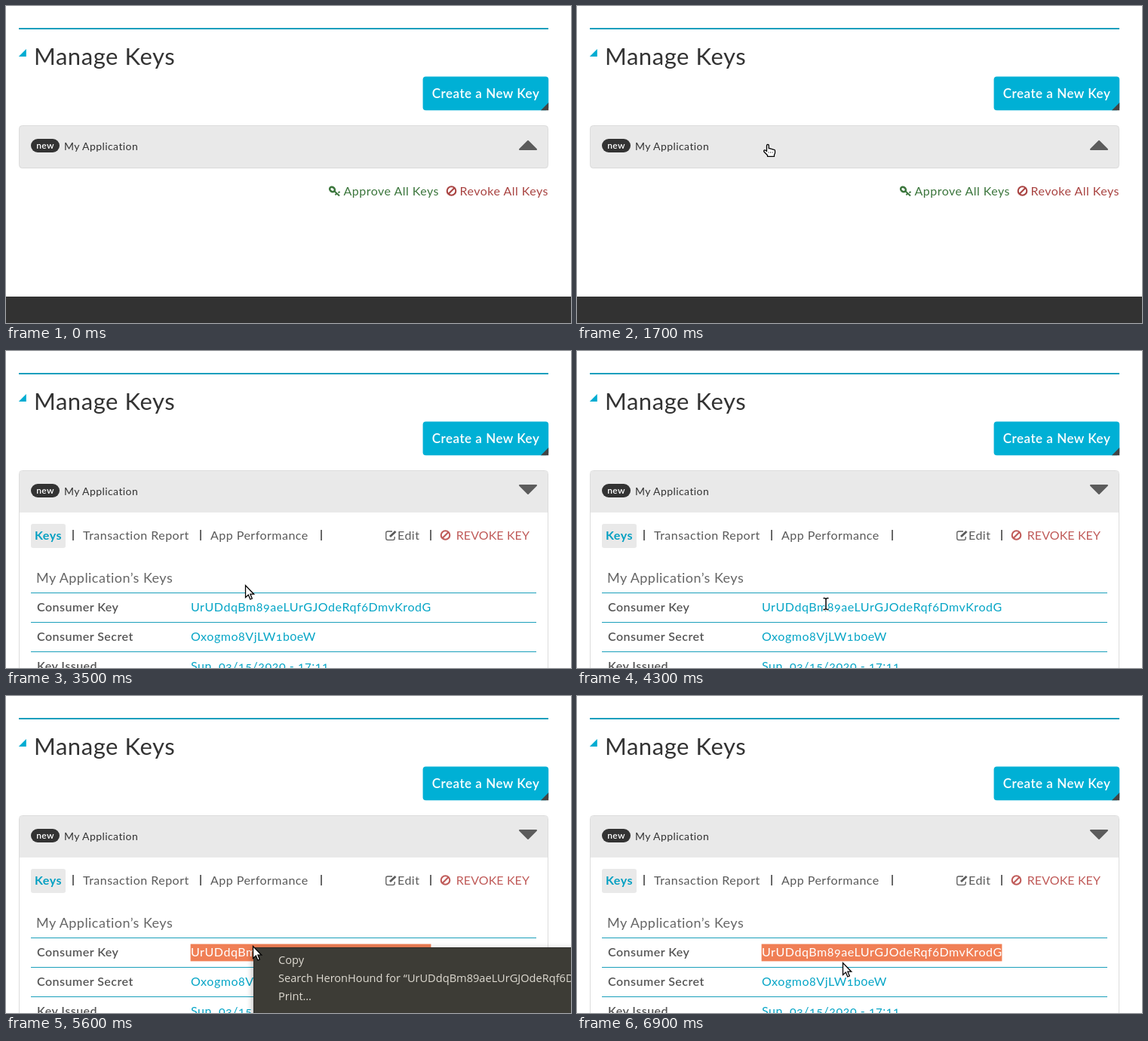
Animation of 749 by 420 pixels, one loop 9.1 s. Source, as an HTML page:

```html
<!DOCTYPE html>
<html lang="en">
<head>
<meta charset="utf-8">
<title>Manage Keys</title>
<style>
  html, body { margin: 0; width: 100%; height: 100%; overflow: hidden; background: #fff; }
  svg { display: block; width: 749px; height: 420px; }
  text { font: 16px Lato, "Open Sans", sans-serif; letter-spacing: .03em; font-variant-numeric: oldstyle-nums; white-space: pre; }
  .title { font-size: 31px; letter-spacing: .018em; fill: #333; }
  .button { font-size: 17px; font-weight: 600; fill: #fff; }
  .badge { font-size: 12px; font-weight: 600; fill: #fff; }
  .app { font-size: 14px; fill: #333; }
  .caption { font-size: 18px; letter-spacing: .025em; fill: #666; }
  .label { font-weight: 600; fill: #555; }
  .value { letter-spacing: .035em; fill: #05a5c6; }
  .tab { fill: #5a5a5a; }
  .current { font-weight: 700; fill: #05a0c2; }
  .green { fill: #3c763d; color: #3c763d; }
  .red { fill: #a94442; color: #a94442; }
  .pale { fill: #c05b59; color: #c05b59; }
  .pale text { letter-spacing: .006em; }
  .chevron { fill: #5c5c5c; stroke: #5c5c5c; stroke-width: 2; stroke-linejoin: round; }
  .end { text-anchor: end; }
  .mid { text-anchor: middle; }
  #menu { filter: drop-shadow(0 3px 5px rgba(0, 0, 0, .35)); }
  #menu text { font: 14.6px "Open Sans", "Noto Sans", sans-serif; letter-spacing: 0; fill: #dfdbd2; }
</style>
</head>
<body>
<svg viewBox="0 0 749 420">
  <defs>
    <linearGradient id="glow" x2="0" y2="1">
      <stop stop-color="#f68456"/>
      <stop offset="1" stop-color="#e9642f"/>
    </linearGradient>
    <g id="ban" fill="none" stroke="currentColor" stroke-width="2.1">
      <circle r="5.8"/>
      <path d="M-4 4 4-4"/>
    </g>
    <path id="stem" d="M-3.5-7.500H-1.500L0-6.500 1.500-7.500H3.500M0-6.500V6.500M-3.500 7.500H-1.500L0 6.500 1.500 7.500H3.500"/>
  </defs>

  <path d="M17 30H719" stroke="#1a9fbd" stroke-width="2.200"/>
  <path d="M16.800 67 26.800 57V67Z" fill="#00acd2"/>
  <text class="title" x="37" y="78">Manage Keys</text>
  <rect x="552.600" y="93.600" width="166.600" height="44.700" rx="4" fill="#00b0d5"/>
  <path d="M709 138.300 719.200 128V138.300Z" fill="#444"/>
  <text class="button mid" x="636" y="122">Create a New Key</text>

  <g id="closed">
    <rect x="17.500" y="159.500" width="701" height="56" rx="4" fill="#f1f1f1"/>
    <rect x="17.500" y="158.500" width="701" height="56" rx="4" fill="#e9e9e9" stroke="#dcdcdc"/>
    <path class="chevron" d="M681 190 692 179 703 190Z"/>
    <g class="green">
      <g fill="none" stroke="currentColor">
        <ellipse cx="432.500" cy="243" rx="3.600" ry="2.900" stroke-width="2.500" transform="rotate(35 432.500 243)"/>
        <path d="M435 245 442 251.500M438 248.500 436.500 250.500M440.500 247.500 442.500 246" stroke-width="2"/>
      </g>
      <text x="447.500" y="251">Approve All Keys</text>
    </g>
    <g class="red">
      <use href="#ban" x="590.500" y="245"/>
      <text class="end" x="719" y="251">Revoke All Keys</text>
    </g>
    <rect y="385" width="749" height="35" fill="#323232"/>
  </g>

  <g id="open">
    <rect x="17.500" y="158.500" width="701" height="280" rx="4" fill="#fff" stroke="#dcdcdc"/>
    <path d="M18 214V162Q18 159 21 159H715Q718 159 718 162V214Z" fill="#e9e9e9"/>
    <path class="chevron" d="M681 178H703L692 189Z"/>

    <rect x="33" y="229" width="46" height="32" rx="3" fill="#e9e9e9"/>
    <text class="current" x="38" y="250">Keys</text>
    <text class="tab" x="102" y="250">Transaction Report</text>
    <text class="tab" x="271" y="250">App Performance</text>
    <path d="M89 237V251M258 237V251M418 237V251M563 237V251" stroke="#444" stroke-width="1.600"/>
    <g fill="none" stroke="#5a5a5a" stroke-width="1.300">
      <path d="M512 239H506Q503.800 239 503.800 241V248Q503.800 250.300 506 250.300H513Q515.200 250.300 515.200 248V246"/>
      <path d="M509 246 516.500 239" stroke-width="2.900"/>
    </g>
    <text class="tab" x="519" y="250">Edit</text>
    <g class="pale">
      <use href="#ban" x="582.500" y="244"/>
      <text class="end" x="694" y="250">REVOKE KEY</text>
    </g>

    <text class="caption" x="40" y="307">My Application’s Keys</text>
    <path d="M33 320.500H703M33 359.500H703M33 398.500H703" stroke="#1a9fbb" stroke-width="1.200"/>
    <text class="label" x="41" y="345">Consumer Key</text>
    <text class="label" x="41" y="384">Consumer Secret</text>
    <text class="label" x="41" y="423">Key Issued</text>
    <rect id="mark" x="244.600" y="328.600" width="318.800" height="22.800" fill="#f07f55"/>
    <text id="key" class="value" x="245" y="345">UrUDdqBm89aeLUrGJOdeRqf6DmvKrodG</text>
    <text class="value" x="245" y="384">Oxogmo8VjLW1b0eW</text>
    <text class="value" x="245" y="423">Sun, 03/15/2020 - 17:11</text>
  </g>

  <rect x="33" y="176" width="38" height="18" rx="9" fill="#333"/>
  <text class="badge mid" x="52" y="189">new</text>
  <text class="app" x="77" y="191">My Application</text>

  <g id="menu">
    <rect x="328.500" y="333.500" width="460" height="120" fill="#3d3c36" stroke="#2d2c29"/>
    <rect id="hover" x="330" y="338" width="440" height="23" fill="url(#glow)"/>
    <text x="361" y="355">Copy</text>
    <text x="361" y="379">Search HeronHound for “UrUDdqBm89aeLUrGJOdeRqf6DmvKrodG”</text>
    <text x="361" y="403">Print…</text>
  </g>

  <path id="arrow" d="M.5.500V16.500L4.300 13 6.800 19 9.300 18 6.900 12.200H11.700Z" fill="#fff" stroke="#000" stroke-width="1.300"/>
  <g id="hand" stroke="#000" stroke-linejoin="round">
    <path d="M4.500 9V2Q4.500.500 5.900.500T7.300 2V5.800Q9 5.300 10 6.400 11.600 6 12.500 7.200 15.500 6.900 15.500 9V12L14.500 14V16.300H5.500V14.800L.9 10Q.3 8.300 1.600 7.900 3 7.800 4.500 9.500Z" fill="#fff" stroke-width="1.300"/>
    <path d="M6.500 11H13.500" stroke-dasharray="1 1.500"/>
  </g>
  <g id="beam" fill="none">
    <use href="#stem" stroke="#fff" stroke-width="3"/>
    <use href="#stem" stroke="#000" stroke-width="1.500"/>
  </g>
</svg>
<script>
  const LOOP = 9100;
  const $ = id => document.getElementById(id);
  const show = (id, on) => { $(id).style.display = on ? '' : 'none'; };

  // Pointer poses: start time, shape, x, y
  const poses = [
    [700, 'arrow', 165, 38], [800, 'arrow', 206, 66], [900, 'arrow', 239, 90],
    [1100, 'arrow', 245, 106], [1200, 'arrow', 251, 132], [1300, 'arrow', 253, 157],
    [1400, 'hand', 247, 180], [1600, 'hand', 247, 181], [1700, 'hand', 247, 183],
    [3200, 'hand', 268, 226], [3300, 'hand', 293, 276], [3500, 'arrow', 317, 310],
    [3700, 'arrow', 325, 322], [3800, 'beam', 334, 339], [3900, 'beam', 338, 334],
    [4300, 'beam', 330, 335], [5600, 'arrow', 327, 331],
    [6100, 'arrow', 333, 337], [6200, 'arrow', 339, 343],
    [6300, 'arrow', 346, 349], [6400, 'arrow', 352, 353]
  ];

  function draw(t) {
    const pose = poses.filter(p => p[0] <= t).pop();
    const [, shape, x, y] = pose || [0, '', 0, 0];
    const opened = t >= 2200;
    const marked = t >= 5000;

    show('closed', !opened);
    show('open', opened);
    show('mark', marked);
    $('key').style.fill = marked ? '#fff' : '';
    show('menu', t >= 5600 && t < 6900);
    show('hover', y > 338);

    for (const id of ['arrow', 'hand', 'beam']) show(id, id === shape);
    if (shape) $(shape).setAttribute('transform', `translate(${x} ${y})`);
  }

  let start;
  function tick(now) {
    start ??= now;
    draw((now - start) % LOOP);
    requestAnimationFrame(tick);
  }
  draw(0);
  requestAnimationFrame(tick);
</script>
</body>
</html>
```
